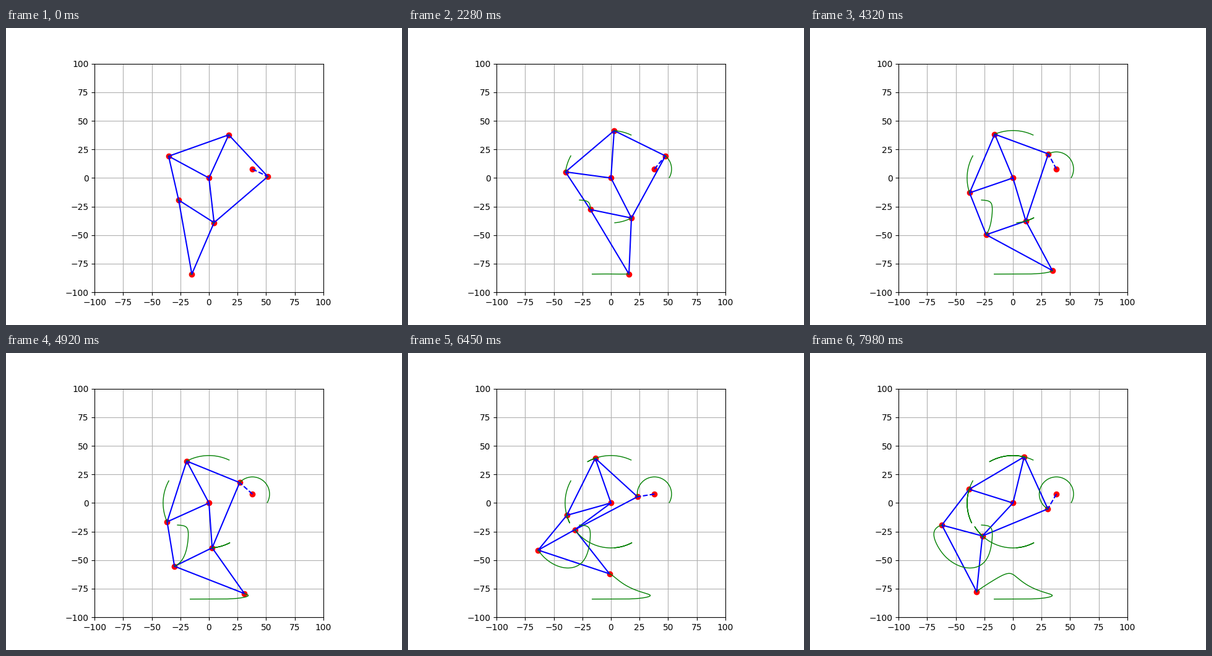
A matplotlib script for the animation above (8 s loop, 640 by 480 pixels).

```python
import numpy as np
import matplotlib.pyplot as plt
from matplotlib.animation import FuncAnimation

# Leg linkage bar lengths
B, C, D, E, F, G, H, I, J, K, M = (
    41.5, 39.3, 40.1, 55.8, 39.4, 36.7, 65.7, 49.0, 50.0, 61.9, 15.0)
PIVOT = np.array([0.0, 0.0])
HUB = np.array([38.0, 7.8])

START_DEG = -30   # where the traces begin
LEAD = 4          # degrees already traced when the loop begins
STEP_MS = 30      # one degree of crank per step
LOOP_MS, TICK_MS = 8000, 20


def joint(p, q, rp, rq):
    """Point at distance rp from p and rq from q, left of p->q."""
    gap = q - p
    dist = np.hypot(*gap)
    along = (dist**2 + rp**2 - rq**2) / (2 * dist)
    side = np.sqrt(rp**2 - along**2)
    ux, uy = gap / dist
    return p + along * np.array([ux, uy]) + side * np.array([-uy, ux])


def solve(deg):
    """Joints for a crank angle: crank, top, left, low, knee, foot."""
    a = np.radians(deg)
    crank = HUB + M * np.array([np.cos(a), np.sin(a)])
    top = joint(PIVOT, crank, B, J)
    low = joint(crank, PIVOT, K, C)
    left = joint(PIVOT, top, D, E)
    knee = joint(low, left, G, F)
    foot = joint(low, knee, I, H)
    return np.array([crank, top, left, low, knee, foot])


steps = LOOP_MS // STEP_MS + LEAD + 1
path = np.array([solve(START_DEG + k) for k in range(steps)])

fig, ax = plt.subplots(figsize=(6.4, 4.8), dpi=100)
ax.set_aspect("equal")
ax.set_xlim(-100, 100)
ax.set_ylim(-100, 100)
ax.set_xticks(range(-100, 101, 25))
ax.set_yticks(range(-100, 101, 25))
ax.grid(True)

# Index pairs into [crank, top, left, low, knee, foot, pivot]
BARS = [(0, 1), (0, 3), (6, 1), (6, 2), (1, 2), (6, 3),
        (2, 4), (3, 4), (4, 5), (3, 5)]

dots, = ax.plot([], [], "ro")
arm, = ax.plot([], [], "b--")
bars = [ax.plot([], [], "b-")[0] for _ in BARS]
traces = [ax.plot([], [], "g-", lw=1)[0] for _ in range(6)]


def draw(i):
    now = LEAD + round(i * TICK_MS / STEP_MS)
    pts = np.vstack([path[now], PIVOT, HUB])
    dots.set_data(pts[:, 0], pts[:, 1])
    arm.set_data(*zip(HUB, pts[0]))
    for bar, (p, q) in zip(bars, BARS):
        bar.set_data(*zip(pts[p], pts[q]))
    for n, trace in enumerate(traces):
        trace.set_data(path[:now + 1, n, 0], path[:now + 1, n, 1])
    return [dots, arm, *bars, *traces]


anim = FuncAnimation(fig, draw, frames=LOOP_MS // TICK_MS, interval=TICK_MS,
                     init_func=lambda: draw(0), repeat=True, repeat_delay=0)
plt.show()
```
